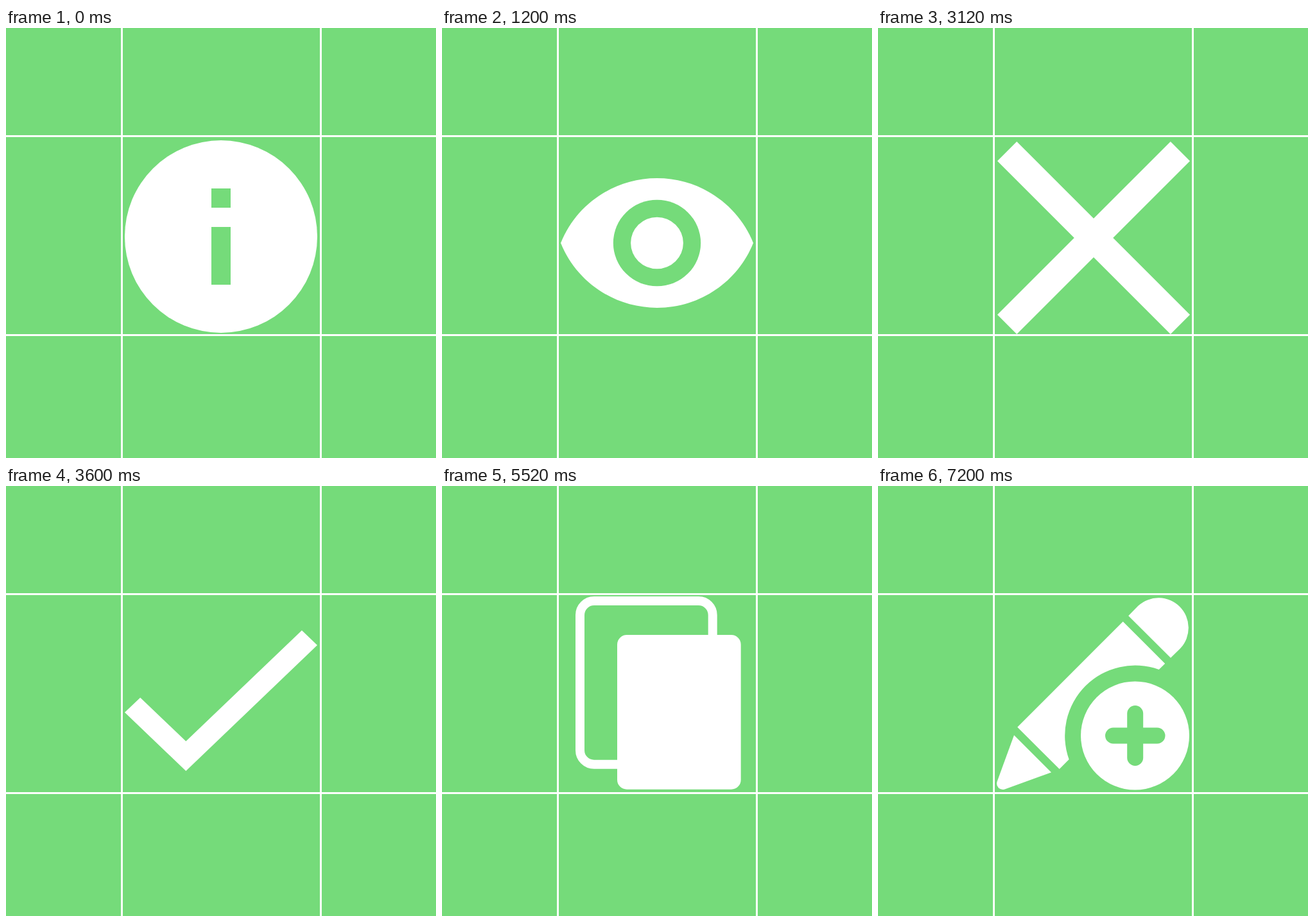
An HTML page for the animation above (8 s loop, 670 by 670 pixels).

```html
<!DOCTYPE html>
<html lang="en">
<head>
<meta charset="utf-8">
<title>Icon set</title>
<style>
  html, body { margin: 0; width: 100%; height: 100%; overflow: hidden; background: #75db7a; }
  svg { display: block; width: 100%; height: 100%; }
  .icon { display: none; fill: #fff; }
  .icon.on { display: inline; }
  .cut { fill: #75db7a; }
  .line { fill: none; stroke: #fff; stroke-width: 3; }
</style>
</head>
<body>
<svg viewBox="0 0 670 670">
  <rect class="cut" width="670" height="670"/>
  <path class="line" d="M180.5 0V670M490.5 0V670M0 168.5H670M0 478.5H670"/>

  <!-- info -->
  <g class="icon on">
    <circle cx="335" cy="325" r="150"/>
    <path class="cut" d="M320 250h30v30h-30zM320 310h30v90h-30z"/>
  </g>

  <!-- eye -->
  <g class="icon" transform="translate(335 335) scale(13.636 13.455)">
    <path d="M0-7.5C-5-7.5-9.27-4.39-11 0c1.73 4.39 6 7.5 11 7.5S9.27 4.39 11 0C9.27-4.39 5-7.5 0-7.5z"/>
    <circle class="cut" r="5"/>
    <circle r="3"/>
  </g>

  <!-- close -->
  <g class="icon" transform="translate(336 327) scale(21.43)">
    <path d="M7-5.59L5.59-7 0-1.41-5.59-7-7-5.59-1.41 0-7 5.59-5.59 7 0 1.41 5.59 7 7 5.59 1.41 0z"/>
  </g>

  <!-- check -->
  <g class="icon" transform="translate(185 225) scale(17.055 16.33)">
    <path d="M5.59 10.58L1.42 6.41 0 7.82 5.59 13.41 17.59 1.41 16.18 0z"/>
  </g>

  <!-- copy -->
  <g class="icon">
    <rect x="215" y="179" width="206.7" height="254.7" rx="22" fill="none" stroke="#fff" stroke-width="14"/>
    <rect class="cut" x="273" y="232" width="192.7" height="240.7" rx="15"/>
    <rect x="273" y="232" width="192.7" height="240.7" rx="15"/>
  </g>

  <!-- message -->
  <g class="icon" transform="translate(185 191) scale(15 13.25)">
    <path d="M18 0H2C.9 0 0 .9 0 2v18l4-4h14c1.1 0 2-.9 2-2V2c0-1.1-.9-2-2-2z"/>
    <path class="cut" d="M4 4h12v2H4zM4 7h12v2H4zM4 10h8v2H4z"/>
  </g>

  <!-- pencil with plus -->
  <g class="icon">
    <path d="M390.2 202.2L405.3 186.8A46.7 46.7 0 0 1 471.3 252.8L456 267.8z"/>
    <path d="M381.7 211.2L447.2 276.7 437.7 286A109.5 109.5 0 0 0 297.6 426L282.7 441 217.2 375.7z"/>
    <path d="M212 388.3L270 446.2 197.6 472.4A9.4 9.4 0 0 1 185.6 460.4z"/>
    <circle cx="400.5" cy="389" r="84.5"/>
    <path d="M366.5 389H435M400.7 354.5V423.5" stroke="#75db7a" stroke-width="25" stroke-linecap="round"/>
  </g>
</svg>
<script>
  const LOOP = 8000, STEP = 1200;
  const icons = document.querySelectorAll('.icon');

  function draw(ms) {
    const active = Math.floor((ms % LOOP) / STEP);
    icons.forEach((icon, i) => icon.classList.toggle('on', i === active));
  }

  const start = performance.now();
  function tick() {
    draw(performance.now() - start);
    requestAnimationFrame(tick);
  }
  tick();
</script>
</body>
</html>
```
